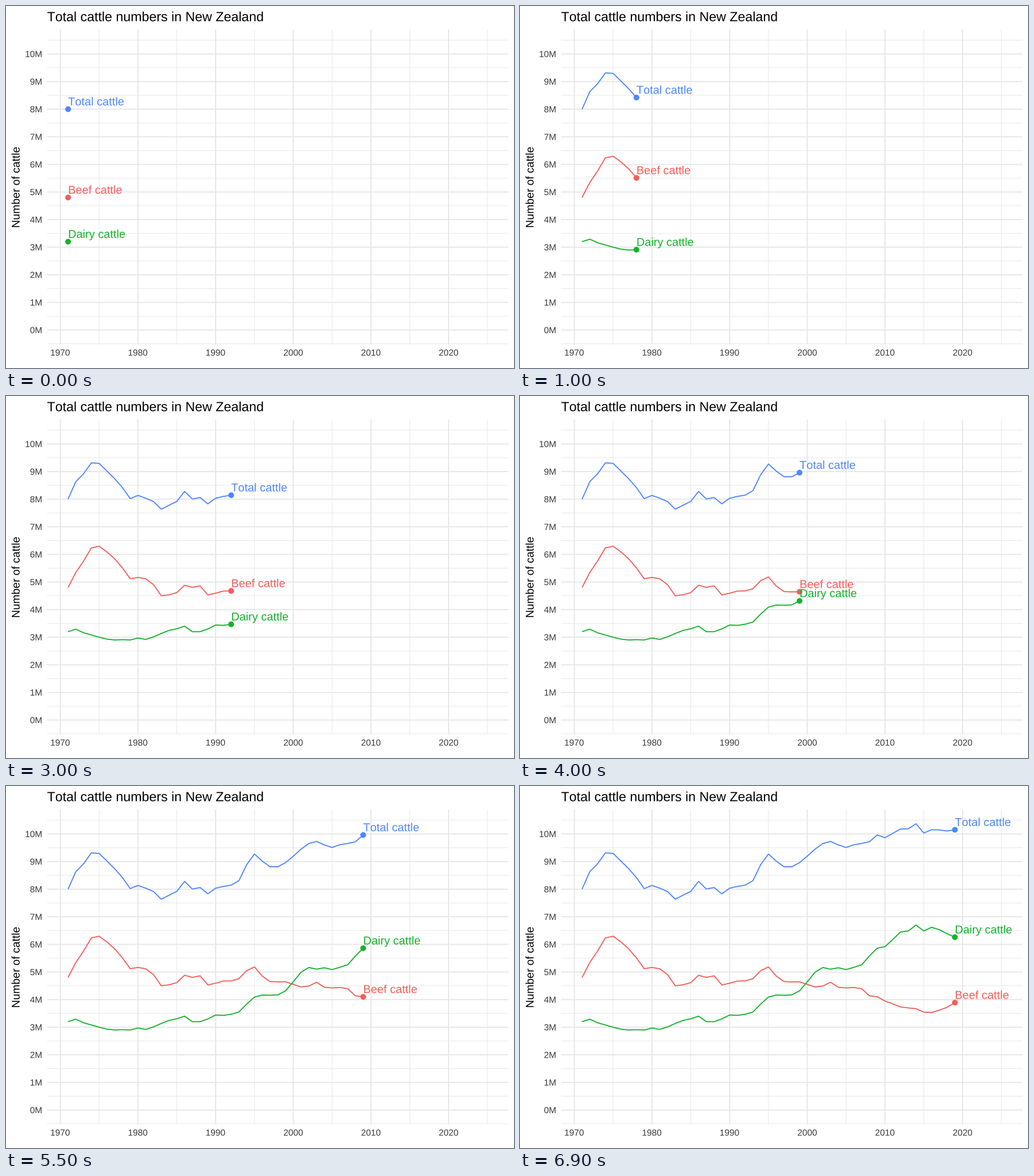
Animation of 885 by 632 pixels, one loop 10 s. Source, as a matplotlib script:

```python
import numpy as np
import matplotlib as mpl
import matplotlib.pyplot as plt
from matplotlib.animation import FuncAnimation
from matplotlib.patches import Circle, PathPatch
from matplotlib.textpath import TextPath
from matplotlib.transforms import Affine2D

W, H, DPI = 885, 632, 64
PT = 72 / DPI                      # points per pixel
FRAMES, REVEAL, INTERVAL = 100, 69, 100

mpl.rcParams["text.kerning_factor"] = 20   # plain advance widths, no kerning

GRID, TICK = "#E6E6E6", "#3C3C3C"
LEFT, RIGHT, TOP, BOTTOM = 71.6, 875.3, 41.0, 590.7
LINE = 1.87
LABEL_SIZE, LABEL_LIFT = 19.98, 6.6

# Millions of head, one value per year from 1971
BEEF = np.array([
    4.80, 5.345, 5.76, 6.235, 6.295, 6.09, 5.84, 5.51, 5.12, 5.165,
    5.115, 4.905, 4.50, 4.535, 4.615, 4.88, 4.805, 4.86, 4.53, 4.593,
    4.671, 4.676, 4.758, 5.048, 5.183, 4.852, 4.655, 4.64, 4.644, 4.55,
    4.457, 4.491, 4.627, 4.447, 4.424, 4.439, 4.394, 4.137, 4.101, 3.949,
    3.846, 3.734, 3.699, 3.670, 3.547, 3.533, 3.616, 3.721, 3.890])
DAIRY = np.array([
    3.20, 3.29, 3.16, 3.08, 3.00, 2.93, 2.90, 2.91, 2.90, 2.97,
    2.92, 3.01, 3.135, 3.245, 3.305, 3.40, 3.20, 3.20, 3.30, 3.441,
    3.429, 3.468, 3.550, 3.839, 4.090, 4.165, 4.157, 4.17, 4.316, 4.645,
    4.993, 5.162, 5.102, 5.153, 5.087, 5.170, 5.261, 5.579, 5.861, 5.915,
    6.175, 6.446, 6.484, 6.698, 6.486, 6.619, 6.530, 6.386, 6.261])
YEARS = 1971 + np.arange(len(BEEF))

# Each year is reached on a whole frame; motion between is linear
STOPS = [round(k * REVEAL / (len(YEARS) - 1)) for k in range(len(YEARS))]


def px(year):
    return 94.6 + (year - 1970) * 13.53


def py(millions):
    return 565.7 - 48.2 * millions


fig = plt.figure(figsize=(W / DPI, H / DPI), dpi=DPI, facecolor="white")
ax = fig.add_axes([0, 0, 1, 1])
ax.set_xlim(0, W)
ax.set_ylim(H, 0)
ax.axis("off")


def place(patch, x, y, turn=0):
    patch.set_transform(Affine2D().rotate_deg(turn).scale(1, -1)
                        .translate(x, y) + ax.transData)


def write(s, x, y, size, color="black", align=0, turn=0):
    """Text with its baseline at y; align None keeps the pen origin at x."""
    path = TextPath((0, 0), s, size=size, prop={"family": "Liberation Sans"})
    if align:
        box = path.get_extents()
        path = path.transformed(
            Affine2D().translate(-box.x0 - align * box.width, 0))
    patch = PathPatch(path, facecolor=color, lw=0, zorder=5)
    place(patch, x, y, turn)
    ax.add_patch(patch)
    return patch


def rule(xs, ys, width, z):
    ax.plot(xs, ys, color=GRID, lw=width * PT, zorder=z, snap=False,
            solid_capstyle="butt")


def draw_grid():
    for m in np.arange(-0.5, 10.6, 0.5):
        major = m == int(m)
        rule([LEFT, RIGHT], [py(m)] * 2, LINE if major else LINE / 2,
             1 + major)
        if major:
            write(f"{int(m)}M", 61.9, py(m) + 5.5, 15.45, TICK, align=1)
    for year in range(1970, 2026, 5):
        major = year % 10 == 0
        rule([px(year)] * 2, [TOP, BOTTOM], LINE if major else LINE / 2,
             1 + major)
        if major:
            write(str(year), px(year), 610.4, 15.45, TICK, align=0.5)


class Series:
    def __init__(self, name, values, color):
        self.y = py(values)
        self.line, = ax.plot([], [], color=color, lw=LINE * PT, zorder=3,
                             snap=False, solid_capstyle="butt",
                             solid_joinstyle="round")
        self.dot = ax.add_patch(Circle((0, 0), 5, fc=color, lw=0, zorder=4))
        self.label = write(name, 0, 0, LABEL_SIZE, color)

    def show(self, frame):
        done = np.searchsorted(STOPS, frame, side="right")
        x = np.interp(frame, STOPS, px(YEARS))
        y = np.interp(frame, STOPS, self.y)
        self.line.set_data(np.append(px(YEARS[:done]), x),
                           np.append(self.y[:done], y))
        self.dot.center = x, y
        place(self.label, x, y - LABEL_LIFT)


draw_grid()
write("Total cattle numbers in New Zealand", LEFT, 26.5, 23.18)
write("Number of cattle", 23.6, 316.2, 19.33, align=0.5, turn=90)

series = [Series("Beef cattle", BEEF, "#F35E5A"),
          Series("Dairy cattle", DAIRY, "#17B12B"),
          Series("Total cattle", BEEF + DAIRY, "#5086FF")]


def update(i):
    for s in series:
        s.show(min(i, REVEAL))
    return []


anim = FuncAnimation(fig, update, frames=FRAMES, interval=INTERVAL,
                     init_func=lambda: update(0), repeat=True,
                     repeat_delay=0, blit=False)
plt.show()
```
